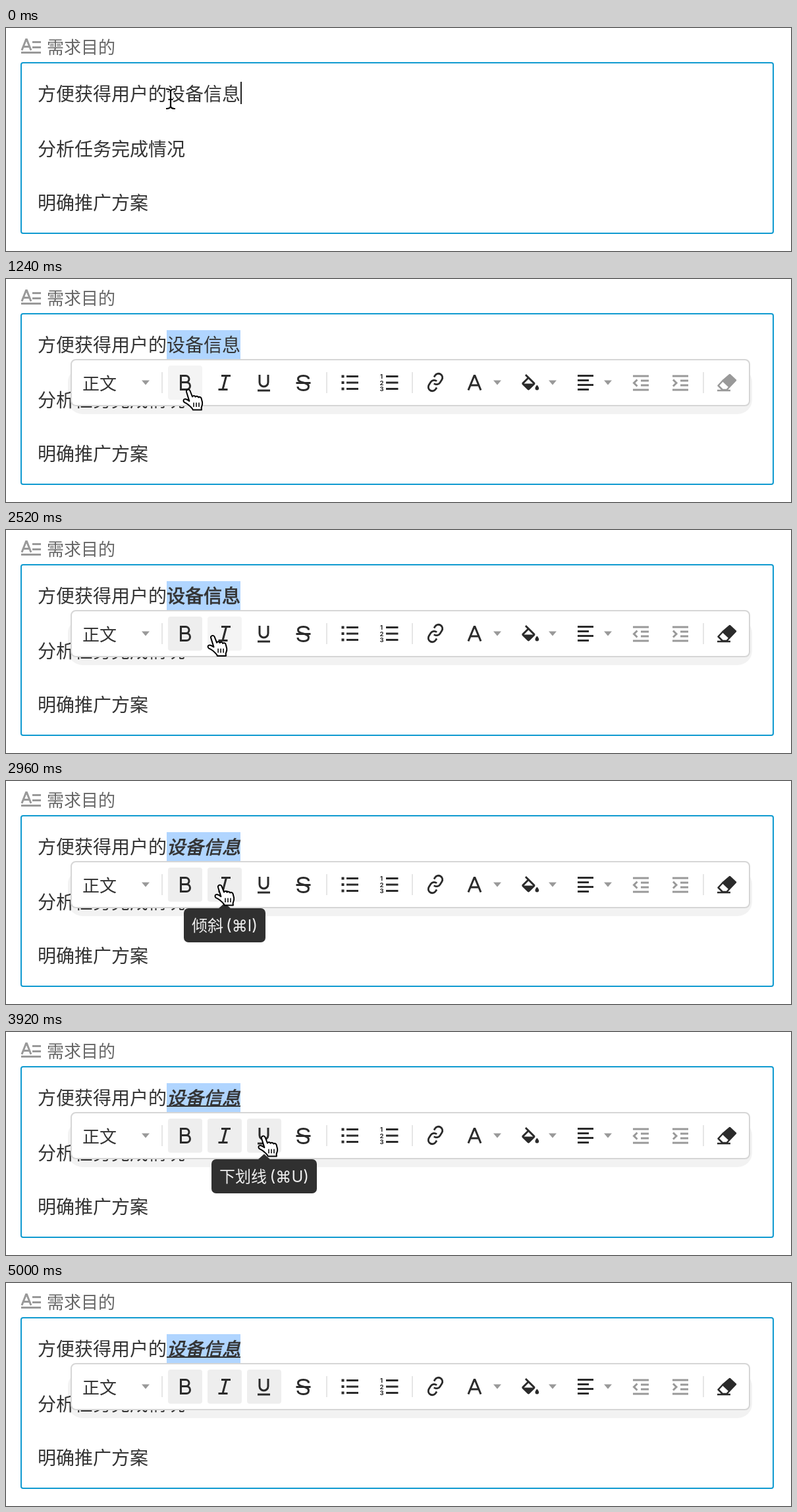
These frames come from a looping animation (1192 by 340 pixels, 5080 ms). An HTML page:

```html
<!DOCTYPE html>
<html lang="zh-CN">
<head>
<meta charset="utf-8">
<title>Rich text toolbar</title>
<style>
  html, body { margin: 0; width: 100%; height: 100%; overflow: hidden; background: #fff; }
  svg { display: block; width: 100%; height: 100%; }
  text { font-family: "Noto Sans CJK SC", "Noto Sans CJK", sans-serif; font-size: 28px; fill: #333; }
  .label { font-size: 26px; fill: #666; }
  .tip text { font-size: 24px; fill: #eee; }
  .tip .keys { font-family: Inter, "Noto Sans CJK SC", sans-serif; text-anchor: end; }
  .digits { font: bold 9.5px Inter, sans-serif; fill: #2b2b2b; }
  .icon { fill: none; stroke: #2b2b2b; stroke-width: 3; }
  .solid { fill: #2b2b2b; }
  .muted { stroke: #999; }
  .bold { stroke: #333; stroke-width: .8px; }
  .italic { font-style: italic; }
</style>
</head>
<body>
<svg viewBox="0 0 1192 340">
  <path class="icon" stroke="#999" style="stroke:#999" d="M24 34l6.5-16.5h1L38 34M27 28.500h8M40 21.500h13M40 29.500h13M23 37.500h30"/>
  <text class="label" x="62" y="38.500">需求目的</text>
  <rect x="23" y="53" width="1142" height="260" rx="3" fill="#fff" stroke="#0f9ad0" stroke-width="2"/>
  <rect id="selection" x="244" y="78" height="44" fill="#b0d5ff"/>
  <text x="48" y="110.500">方便获得用户的</text>
  <text id="picked" x="244" y="110.500">设备信息</text>
  <path id="underline" d="M244 113h112" stroke="#333" stroke-width="2"/>
  <path id="caret" d="M357 82v34" stroke="#222" stroke-width="2"/>
  <text x="48" y="194.500">分析任务完成情况</text>
  <text x="48" y="276.500">明确推广方案</text>

  <g id="toolbar">
    <rect x="94" y="135" width="1039" height="71" rx="22" fill="#000" fill-opacity=".05"/>
    <rect x="99" y="123" width="1030" height="70" rx="7" fill="#fff" stroke="#d6d6d6" stroke-width="2"/>
    <g id="buttons"></g>
    <text x="116" y="168.500" style="font-size:26px">正文</text>
    <path d="M237 142v32M487 142v32M617 142v32M1059 142v32" stroke="#e6e6e6" stroke-width="2"/>
    <g id="arrows" fill="#999"></g>
    <g class="icon">
      <path d="M265.500 147.500h7.500a5 5 0 0 1 0 10h-7.500zM265.500 157.500h8.500a5.500 5.500 0 0 1 0 11h-8.500z"/>
      <path d="M327 147.500h14M322.500 168.500h14M334.500 147.500l-5.500 21"/>
      <path d="M385 146v11.500a6.500 6.500 0 0 0 13 0v-11.500M382 170h19"/>
      <path d="M459.500 152.500c0-3-3-5-8-5s-8 2-8 5.200 4 4.300 8 5.300 8 2 8 6-3.500 5.500-8 5.500-8.500-2-8.500-5.500M440.500 158.500h22"/>
      <path d="M517 148.500h18M517 158h18M517 167.500h18M577 148.500h18.500M577 158h18.500M577 167.500h18.500"/>
      <path d="M509.500 148.500h4M509.500 158h4M509.500 167.500h4" stroke-width="4"/>
      <g transform="translate(652 157.500) rotate(-12) scale(1.220) translate(-12 -12)" stroke-width="2.300">
        <path d="M10 13a5 5 0 0 0 7.540.540l3-3a5 5 0 0 0-7.070-7.070l-1.720 1.710"/>
        <path d="M14 11a5 5 0 0 0-7.540-.540l-3 3a5 5 0 0 0 7.070 7.070l1.710-1.710"/>
      </g>
      <path d="M702 169.500l9-22h1l9 22M706 162h11"/>
      <path d="M868 147.500h24M868 154.500h17M868 161.500h24M868 168.500h17" stroke-width="2.800"/>
      <path class="muted" d="M952 148h24M964 155h12M964 162h12M952 169h24M958.500 153.500l-5 5 5 5"/>
      <path class="muted" d="M1012 148h24M1024 155h12M1024 162h12M1012 169h24M1013 153.500l5 5-5 5"/>
    </g>
    <g class="digits"><text class="digits" x="568" y="152">1</text><text class="digits" x="567.500" y="161.500">2</text><text class="digits" x="567.500" y="171">3</text></g>
    <path class="solid" transform="translate(779 145) scale(1.440)" d="M16.560 8.940L7.620 0 6.210 1.410l2.380 2.380-5.150 5.150c-.590.590-.590 1.540 0 2.120l5.500 5.500c.580.580 1.540.580 2.120 0l5.500-5.500c.590-.580.590-1.530 0-2.120zM5.210 10L10 5.210 14.790 10zM19 11.500s-2 2.170-2 3.500a2 2 0 0 0 4 0c0-1.330-2-3.500-2-3.500z"/>
    <g id="eraser" stroke-width="2.500" stroke-linejoin="round">
      <path d="M1099 146l9 8.500-9.500 10-10-9.500z"/>
      <path fill="none" d="M1088.500 155l-7 7.500 6.500 6.500h6.500l4-4.500M1080 170h20"/>
    </g>
  </g>
  <g id="tips"></g>

  <g id="beam" fill="none">
    <g id="beamShape"><path d="M-7-15c4 0 7 1 7 4 0-3 3-4 7-4M-7 15c4 0 7-1 7-4 0 3 3 4 7 4M0-11v22M-3.500 1h7"/></g>
  </g>
  <g id="hand" stroke="#000" stroke-width="2" stroke-linejoin="round">
    <path fill="#fff" d="M-3 3c-1-3 4-5 5.500-1.500l3.500 9c1-2 4-2 4.500.300 1-1.500 4-1.500 4.600.800 1.200-1.300 4-.800 4.500 1.500l1.500 6c.700 3-.800 6-1.500 8l.300 3.500h-13l-1-2c-3-3.500-7-7.500-12-9.500-2.500-2-1.500-5 1-5 2 0 4.500 1.500 6.500 3z"/>
    <path fill="none" stroke-width="1.500" d="M8 19.500v6.500M12 19.500v6.500M16 19.500v6.500"/>
  </g>
</svg>
<script>
const LOOP = 5080, TICK = 40;
const $ = id => document.getElementById(id);
const show = (el, on) => el.style.display = on ? "" : "none";

const buttons = [
  { x: 272, width: 136, name: "加粗", key: "B", applied: 1720, tip: [1440, 2360] },
  { x: 332, width: 124, name: "倾斜", key: "I", applied: 2760, tip: [2640, 3440] },
  { x: 392, width: 160, name: "下划线", key: "U", applied: 3840, tip: [3760, 4920] },
  { x: 452 }
];

// Pointer waypoints: time, x, y
const route = [
  [0, 250, 108], [520, 466, 108], [920, 466, 108], [1240, 277, 169],
  [1440, 283, 168], [2200, 283, 168], [2680, 325, 159],
  [3280, 325, 159], [3800, 391, 159], [4760, 391, 159], [5000, 800, 365], [LOOP, 800, 365]
];

$("arrows").innerHTML = [212, 746, 830, 914]
  .map(x => `<path d="M${x - 6} 154.500h12l-6 7z"/>`).join("");
$("buttons").innerHTML = buttons
  .map(b => `<rect x="${b.x - 26}" y="132" width="52" height="52" rx="4"/>`).join("");
$("tips").innerHTML = buttons.filter(b => b.tip).map(b => {
  const left = b.x - b.width / 2;
  return `<g class="tip">
    <path fill="#303030" d="M${b.x - 10} 195l10-9 10 9z"/>
    <rect x="${left}" y="194" width="${b.width}" height="52" rx="7" fill="#303030"/>
    <text x="${left + 12}" y="228.500">${b.name}</text>
    <text class="keys" x="${left + b.width - 12}" y="228.500">(⌘${b.key})</text>
  </g>`;
}).join("");

// White halo below the black I-beam
const halo = $("beamShape").cloneNode(true);
halo.setAttribute("stroke", "#fff");
halo.setAttribute("stroke-width", 5);
$("beam").prepend(halo);
$("beam").lastElementChild.setAttribute("stroke", "#000");
$("beam").lastElementChild.setAttribute("stroke-width", 2.2);

function pointerAt(t) {
  const i = Math.max(1, route.findIndex(p => p[0] > t));
  const [t0, x0, y0] = route[i - 1], [t1, x1, y1] = route[i];
  const p = (t - t0) / (t1 - t0);
  const k = t >= 4760 ? p : p * p * (3 - 2 * p);
  return [x0 + (x1 - x0) * k, y0 + (y1 - y0) * k];
}

function draw(t) {
  const [x, y] = pointerAt(t);
  const open = t >= 600;
  const onToolbar = open && y > 123 && y < 193 && x > 98 && x < 1130;
  const [bold, italic, underlined] = buttons.map(b => t >= b.applied);

  const count = t >= 520 ? 4 : Math.max(0, Math.min(4, Math.round((x - 244) / 28)));
  $("selection").setAttribute("width", count * 28);
  show($("caret"), t < TICK);
  show($("toolbar"), open);
  $("picked").setAttribute("class", (bold ? "bold " : "") + (italic ? "italic" : ""));
  show($("underline"), underlined);
  $("eraser").setAttribute("fill", bold ? "#2b2b2b" : "#999");
  $("eraser").setAttribute("stroke", bold ? "#2b2b2b" : "#999");

  buttons.forEach((b, i) => {
    const hovered = onToolbar && y > 132 && y < 184 && Math.abs(x - b.x) < 26;
    const fill = t >= b.applied ? "#eee" : hovered ? "#f4f4f4" : "none";
    $("buttons").children[i].setAttribute("fill", fill);
    if (b.tip) show($("tips").children[i], t >= b.tip[0] && t < b.tip[1]);
  });

  show($("hand"), onToolbar);
  show($("beam"), !onToolbar);
  $(onToolbar ? "hand" : "beam").setAttribute("transform", `translate(${x} ${y})`);
}

const start = performance.now();
function frame() {
  const t = (performance.now() - start) % LOOP;
  draw(Math.floor(t / TICK) * TICK);
  requestAnimationFrame(frame);
}
frame();
</script>
</body>
</html>
```
